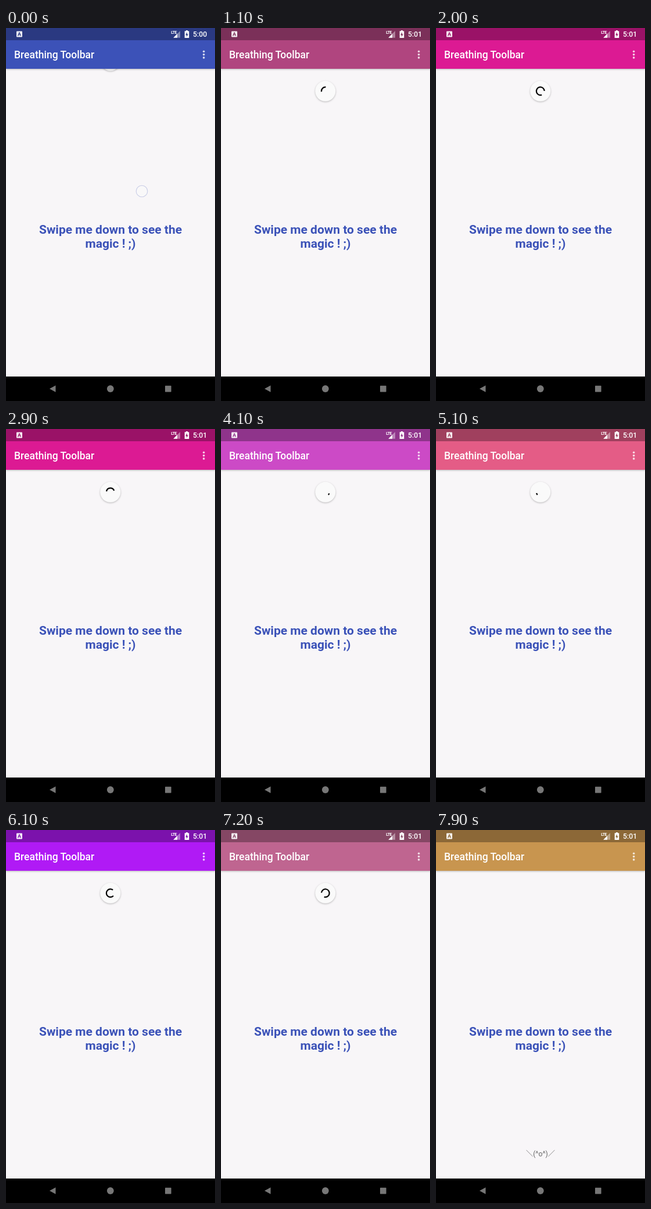
These frames come from a looping animation (360 px wide and 640 px high, 8 s). An HTML page:

```html
<!DOCTYPE html>
<html lang="en">
<head>
<meta charset="utf-8">
<title>Breathing Toolbar</title>
<style>
  html, body { margin: 0; width: 100%; height: 100%; overflow: hidden; background: #f8f6f8; }
  svg { display: block; width: 360px; height: 640px; font-family: Roboto, "Noto Sans", sans-serif; }
  .shade { filter: drop-shadow(0 1px 1.5px rgba(0, 0, 0, .26)); }
</style>
</head>
<body>
<svg viewBox="0 0 360 640">
  <rect width="360" height="640" fill="#f8f6f8"/>
  <g fill="#3b52b8" font-size="21" font-weight="700" text-anchor="middle">
    <text x="180" y="352.5">Swipe me down to see the</text>
    <text x="180" y="377">magic ! ;)</text>
  </g>

  <text id="toast" x="180" y="560" font-size="12.25" fill="#666" text-anchor="middle"
    style="font-family: Roboto, 'Noto Sans CJK JP', 'Noto Sans CJK', sans-serif">＼(^o^)／</text>

  <g id="spinner">
    <circle class="shade" r="17.5" fill="#fafafa"/>
    <path id="arc" fill="none" stroke="#000" stroke-width="2.2"/>
    <path id="arrow" d="M-4.4 0H4.4L0 4.4Z"/>
  </g>

  <rect class="shade" id="bar" y="21" width="360" height="49"/>
  <rect id="status" width="360" height="21"/>
  <text x="14" y="52" font-size="17.5" font-weight="500" fill="#fff">Breathing Toolbar</text>
  <g fill="#fff" opacity=".78">
    <circle cx="340.7" cy="40.3" r="1.8"/>
    <circle cx="340.7" cy="45.6" r="1.8"/>
    <circle cx="340.7" cy="50.9" r="1.8"/>
  </g>

  <g fill="#fff">
    <path fill-rule="evenodd" opacity=".92"
      d="M19 5.5H27Q28 5.5 28 6.5V14.5Q28 15.5 27 15.5H19Q18 15.5 18 14.5V6.5Q18 5.5 19 5.5Z
         M22.3 7.5L19.9 13.6H21.2L21.7 12.2H24.3L24.8 13.6H26.1L23.7 7.5ZM23 8.9L23.9 11.2H22.1Z"/>
    <text x="284.3" y="10" font-size="7" font-weight="700" textLength="auto" letter-spacing="-.6">LTE</text>
    <path d="M300 5V16.8H288.3Z" opacity=".4"/>
    <path d="M295 10V16.8H288.3Z"/>
    <path fill-rule="evenodd"
      d="M310 4H313V5.2H315.3V17H307.7V5.2H310ZM312 7L309.3 11.9H311V15.3L313.8 10.4H312Z"/>
    <text id="clock" x="322" y="15.3" font-size="12.25" font-weight="500"></text>
  </g>

  <circle id="touch" cx="234" r="9.8" fill="#fafafa" fill-opacity=".7" stroke="#c8cce6" stroke-width="1.1"/>

  <rect y="598" width="360" height="42"/>
  <g fill="#777">
    <path d="M75 619L85.5 613.3V624.7Z"/>
    <circle cx="179.8" cy="619" r="5.9"/>
    <rect x="274" y="613.8" width="10.6" height="10.6" rx=".6"/>
  </g>
</svg>
<script>
const LOOP = 8000, STEP = 100;
const RELEASE = 667, SPIN = 1334, CYCLE = 1332, DONE = 7500;
const $ = id => document.getElementById(id);
const clamp = x => Math.min(1, Math.max(0, x));
const mix = (a, b, k) => a + (b - a) * k;

// time, red, green, blue
const COLORS = [
  [0, 60, 82, 184], [800, 60, 82, 184], [1100, 176, 69, 127],
  [2000, 220, 26, 147], [3650, 220, 26, 147], [4100, 204, 74, 198],
  [5100, 228, 92, 134], [6100, 176, 26, 245], [7900, 200, 149, 79]
];

function colorAt(t) {
  let i = COLORS.length - 2;
  while (i > 0 && COLORS[i][0] > t) i--;
  const a = COLORS[i], b = COLORS[i + 1];
  const k = clamp((t - a[0]) / (b[0] - a[0]));
  return [1, 2, 3].map(c => mix(a[c], b[c], k));
}

const rgb = (c, k = 1) => `rgb(${c.map(v => Math.round(v * k)).join()})`;

// cubic-bezier(.4, 0, .2, 1)
function ease(x) {
  let lo = 0, hi = 1;
  for (let i = 0; i < 24; i++) {
    const s = (lo + hi) / 2, r = 1 - s;
    if (1.2 * r * r * s + .6 * r * s * s + s * s * s < x) lo = s; else hi = s;
  }
  return lo * lo * (3 - 2 * lo);
}

// Tail and head of the arc, in degrees clockwise from three o'clock
function arcAt(t) {
  if (t < RELEASE) {
    const k = t / RELEASE, tail = mix(-45, 324, k);
    return [tail, tail + 288 * clamp(k * 1.6)];
  }
  if (t < SPIN) {
    const k = (t - RELEASE) / (SPIN - RELEASE), head = mix(252, 288, k);
    return [head - mix(288, 3.6, k), head];
  }
  const turns = (t - SPIN) / CYCLE, n = Math.floor(turns), p = turns - n;
  const base = 284.4 + 216 * n + 291.6 * p;
  return p < .5
    ? [base, base + 3.6 + 284.4 * ease(p * 2)]
    : [base + 284.4 * ease(p * 2 - 1), base + 288];
}

function arcPath(tail, head) {
  const r = 6.9;
  const point = deg => {
    const a = deg * Math.PI / 180;
    return `${(r * Math.cos(a)).toFixed(2)} ${(r * Math.sin(a)).toFixed(2)}`;
  };
  return `M${point(tail)}A${r} ${r} 0 ${head - tail > 180 ? 1 : 0} 1 ${point(head)}`;
}

function spinnerY(t) {
  if (t < RELEASE) return mix(56, 164, clamp(t / 600));
  const k = 1 - clamp((t - RELEASE) / 200);
  return mix(108.3, 164, k * k);
}

function draw(t) {
  const color = colorAt(t), dragging = t < RELEASE;
  $("bar").setAttribute("fill", rgb(color));
  $("status").setAttribute("fill", rgb(color, .7));
  $("clock").textContent = t < 500 ? "5:00" : "5:01";

  const touch = $("touch");
  touch.setAttribute("cy", mix(280, 510, clamp(t / 600)));
  touch.setAttribute("visibility", dragging ? "visible" : "hidden");

  const [tail, head] = arcAt(t), size = 1 - clamp((t - DONE) / 150);
  const spinner = $("spinner");
  spinner.setAttribute("transform", `translate(179.8 ${spinnerY(t)}) scale(${size})`);
  spinner.setAttribute("visibility", size > 0 ? "visible" : "hidden");

  const fade = dragging ? mix(.3, 1, clamp(t / 400)) : 1;
  $("arc").setAttribute("d", arcPath(tail, head));
  $("arc").setAttribute("opacity", fade);
  const arrow = $("arrow");
  const tip = dragging ? clamp(t / 400) : 1 - clamp((t - RELEASE) / 300);
  arrow.setAttribute("transform", `rotate(${head}) translate(6.9 0) scale(${tip})`);
  arrow.setAttribute("opacity", tip > 0 ? fade : 0);

  $("toast").setAttribute("opacity", clamp((t - DONE) / 300));
}

const start = performance.now();
function tick() {
  const t = (performance.now() - start) % LOOP;
  draw(Math.floor(t / STEP) * STEP);
  requestAnimationFrame(tick);
}
tick();
</script>
</body>
</html>
```
